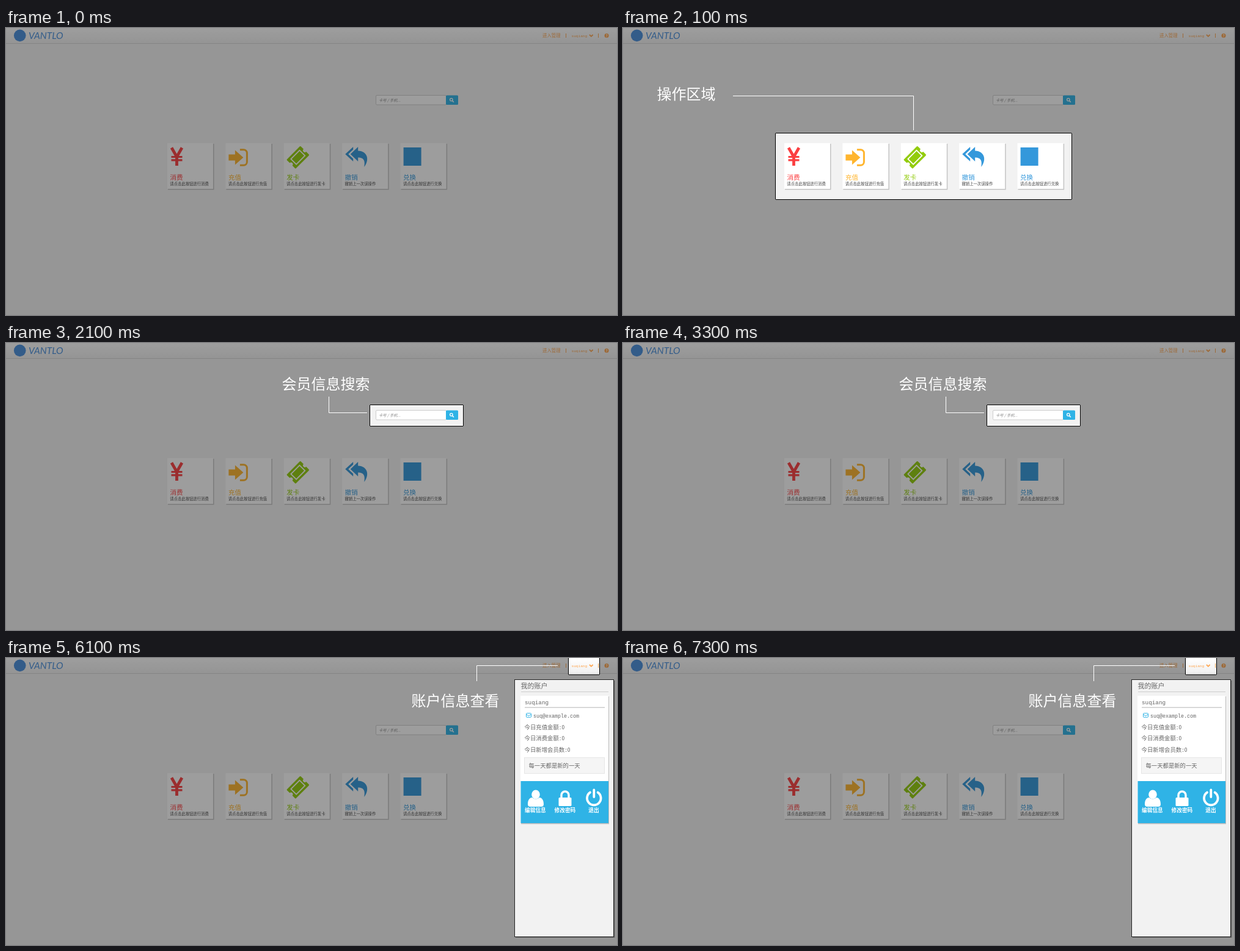
Write an HTML page that moves like this. It is 1000 by 471 pixels and loops after 8.1 s.

```html
<!DOCTYPE html>
<html lang="zh-CN">
<head>
<meta charset="utf-8">
<style>
html, body { margin: 0; width: 100%; height: 100%; overflow: hidden; background: #969696; }
svg { display: block; width: 1000px; height: 471px; }
text { font-family: "Noto Sans CJK SC", "Noto Sans CJK", sans-serif; white-space: pre; }
.mono { font-family: "Liberation Mono", monospace; }
.half { font-family: "Noto Sans Mono CJK SC", "Noto Sans CJK SC", monospace; }
.call { font-size: 24px; fill: #fff; }
</style>
</head>
<body>
<svg id="stage" viewBox="0 0 1000 471" xmlns="http://www.w3.org/2000/svg"></svg>
<script>
const red = '#fb3f41', orange = '#ffb52e', green = '#93cc0c', blue = '#3498db', sky = '#2fb3e6';
const nav = '#ffa650', mark = '#4a90dd', ink = '#444', grey = '#666', pale = '#f2f2f2', rule = '#ccc';

const text = (x, y, size, fill, str, extra = '') =>
  `<text x="${x}" y="${y}" font-size="${size}" fill="${fill}" ${extra}>${str}</text>`;
const rect = (x, y, w, h, fill, extra = '') =>
  `<rect x="${x}" y="${y}" width="${w}" height="${h}" fill="${fill}" ${extra}/>`;
const circle = (x, y, r, fill, extra = '') =>
  `<circle cx="${x}" cy="${y}" r="${r}" fill="${fill}" ${extra}/>`;
const path = (d, fill, extra = '') => `<path d="${d}" fill="${fill}" ${extra}/>`;
const line = (d, color, width, extra = '') =>
  path(d, 'none', `stroke="${color}" stroke-width="${width}" ${extra}`);

const icons = {
  yen: c => line('M7 7.5L15.5 22.5L24 7.5M15.5 21V37', c, 4.8) + line('M6.5 22.5h18M6.5 27.8h18', c, 3.2),
  enter: c => path('M5 18.5H15.5V11.5L29 23.5L15.5 35.5V28.5H5Z', c) +
    line('M23.5 10.7H29.5a5.5 5.5 0 0 1 5.5 5.5v14.6a5.5 5.5 0 0 1 -5.5 5.5H23.5', c, 3),
  ticket: c => '<g transform="translate(23 23.3) rotate(-45)">' +
    rect(-16, -10.5, 32, 21, c, 'rx="1.5"') + rect(-10, -6.2, 20, 12.4, 'none', 'stroke="#fff" stroke-width="1.8"') +
    circle(-16, 0, 3, '#fff') + circle(16, 0, 3, '#fff') + '</g>',
  undo: c => path('M18 6L5 18L18 30V25.5L10 18L18 10.5Z', c) +
    path('M26 6L13.5 18L26 30V23.5C35 23.5 38 28 36 39C45 28 42 13 26 12.5Z', c),
  square: c => rect(5, 7, 29, 30, c)
};

const cards = [
  ['yen', red, '消费', '请点击此按钮进行消费'],
  ['enter', orange, '充值', '请点击此按钮进行充值'],
  ['ticket', green, '发卡', '请点击此按钮进行发卡'],
  ['undo', blue, '撤销', '撤销上一次误操作'],
  ['square', blue, '兑换', '请点击此按钮进行兑换']
];

const drawCard = ([icon, color, title, note], i) =>
  `<g transform="translate(${264 + 95.4 * i} 189)">` +
  rect(1, 1, 75.5, 75.5, '#c4c4c4') + rect(0, 0, 75, 75, '#fff') + icons[icon](color) +
  text(4.5, 59.5, 10.5, color, title) + text(4.3, 69.2, 6.35, ink, note) + '</g>';

function drawHeader() {
  return '<linearGradient id="bar" x2="0" y2="1"><stop stop-color="#fff"/>' +
    '<stop offset="1" stop-color="#f0f0f0"/></linearGradient>' +
    rect(0, 0, 1000, 25, 'url(#bar)') + rect(0, 25, 1000, 1, '#d4d4d4') +
    circle(22.7, 12.4, 9.8, mark) +
    text(37, 18, 15.5, mark, 'VANTLO', 'style="font-family:Lato,sans-serif" font-style="italic"') +
    text(878, 15.3, 7.45, nav, '进入管理') + text(925.5, 15, 6.1, nav, 'suqiang', 'class="mono"') +
    line('M916.5 9v7M969.5 9v7', nav, 1) + line('M955 11l2.8 2.8l2.8 -2.8', nav, 1.8) +
    circle(983, 12.6, 3.5, nav) + text(983, 14.9, 6, '#fff', '?', 'text-anchor="middle" font-weight="bold"');
}

function drawPage() {
  return rect(0, 0, 1000, 471, pale) + drawHeader() +
    rect(605.5, 110.5, 115, 15.5, '#fff', `stroke="${rule}" rx="1.5"`) +
    text(610, 120.6, 6.3, '#888', '卡号 / 手机...', 'font-style="italic"') +
    rect(720, 110.5, 20, 15.5, sky, 'rx="1.5"') +
    circle(728.8, 117.6, 2.2, 'none', 'stroke="#fff" stroke-width="1.3"') +
    line('M730.4 119.3l2.4 2.4', '#fff', 1.6) +
    cards.map(drawCard).join('');
}

function drawPanel() {
  const label = (x, str) => text(x, 253, 8.7, '#fff', str, 'font-weight="bold"');
  return rect(834, 37, 162.5, 422, '#0005') + rect(832.5, 35.5, 162, 422, pale, 'stroke="#222"') +
    text(842.5, 50, 11, grey, '我的账户') + rect(843, 55, 143, 1, rule) +
    rect(843, 63, 144, 209.5, '#bbb') + rect(842, 62, 144, 209, '#fff') +
    text(849, 76, 9.3, grey, 'suqiang', 'class="mono"') + rect(849, 80.5, 131, 1.5, rule) +
    rect(851.5, 90.7, 8, 6.6, 'none', `stroke="${sky}" rx="1"`) + line('M851.8 92.5l3.7 2.6l3.7 -2.6', sky, 1) +
    text(863, 97.5, 8.35, grey, 'suq@example.com', 'class="mono"') +
    ['今日充值金额:0', '今日消费金额:0', '今日新增会员数:0']
      .map((s, i) => text(848.5, 116.5 + 18.7 * i, 9.4, grey, s, 'class="half"')).join('') +
    rect(848.5, 163.5, 131, 26, '#f5f5f5', 'stroke="#e6e6e6"') + text(855.5, 179.5, 9.35, grey, '每一天都是新的一天') +
    rect(842.5, 202, 143.5, 69, sky) +
    path('M854 240C854 233 857 229 861 229Q867 234 873 229C877 229 880 233 880 240Q880 244 876 244H858Q854 244 854 240Z', '#fff') +
    '<ellipse cx="867" cy="224" rx="6.8" ry="7.5" fill="#fff"/>' +
    rect(904.5, 229, 21, 14, '#fff', 'rx="1.5"') + line('M909 230v-5a6 6 0 0 1 12 0v5', '#fff', 3.4) +
    line('M956 220.6a11.3 11.3 0 1 0 12.6 0M962.3 216.5v11.5', '#fff', 3.8, 'stroke-linecap="round"') +
    label(849, '编辑信息') + label(897.5, '修改密码') + label(953.3, '退出');
}

// Each scene: start, spotlight [x, y, w, h], pointer line, caption
const scenes = [
  { at: 0 },
  { at: 100, box: [249, 172, 486, 110], wire: 'M180 111.5H475.5V168', words: [55.5, 117, '操作区域'] },
  { at: 2100, box: [595, 101, 154, 36], wire: 'M528.5 88V114.5H591', words: [451.5, 75.7, '会员信息搜索'] },
  { at: 4100, box: [868, -1, 52, 29], wire: 'M801 65.5H890.5V32', words: [537.5, 73.8, '进入管理页面（管理员）'] },
  { at: 6100, box: [920, -1, 52, 29], wire: 'M770.5 38V12.5H903', words: [663.5, 79, '账户信息查看'], panel: true }
];

// The shade covers the page except for the spotlight
function drawShade(box) {
  const hole = box ? `M${box[0]} ${box[1]}h${box[2]}v${box[3]}h${-box[2]}z` : '';
  return path('M0 -1H1000V471H0Z' + hole, '#141414', 'fill-opacity="0.414" fill-rule="evenodd"');
}

function drawScene({ box, wire, words, panel }) {
  let out = drawShade(box);
  if (box) {
    const [x, y, w, h] = box, [tx, ty, str] = words;
    out += rect(x + 0.5, y + 0.5, w - 1, h - 1, 'none', 'stroke="#000" rx="0.5"') +
      line(wire, '#fff', 1) + `<text class="call" x="${tx}" y="${ty}">${str}</text>`;
  }
  return `<g class="scene">${out}${panel ? drawPanel() : ''}</g>`;
}

const stage = document.getElementById('stage');
stage.innerHTML = drawPage() + scenes.map(drawScene).join('');
const groups = [...stage.querySelectorAll('.scene')];

function tick() {
  const t = performance.now() % 8100;
  const now = scenes.filter(s => s.at <= t).length - 1;
  groups.forEach((g, i) => g.setAttribute('visibility', i === now ? 'visible' : 'hidden'));
  requestAnimationFrame(tick);
}
tick();
</script>
</body>
</html>
```
